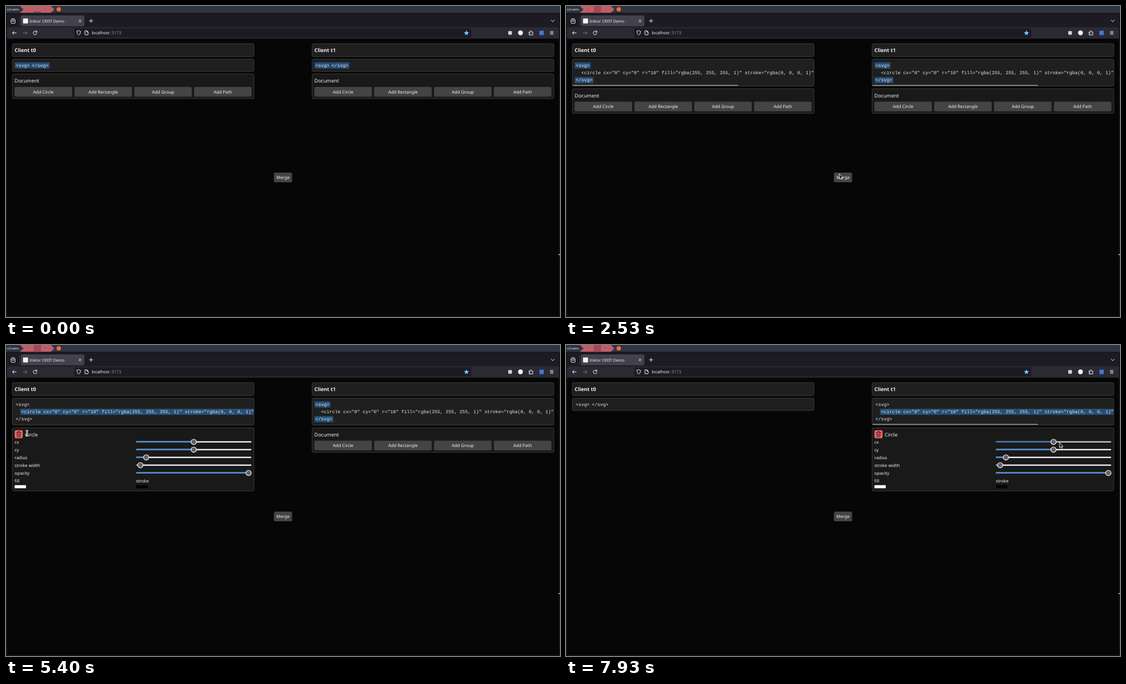
An HTML page for the animation above (8 s loop, 998x561 px).

```html
<!DOCTYPE html>
<html lang="en">
<head>
<meta charset="utf-8">
<title>CRDT demo</title>
<style>
  html, body { margin: 0; width: 100%; height: 100%; overflow: hidden; background: #060606; }
  svg { display: block; width: 998px; height: 561px; }
  text { font-family: "Noto Sans", sans-serif; font-size: 7.85px; fill: #f2f2f2; text-rendering: geometricPrecision; white-space: pre; }
  .code { font-family: "Liberation Mono", monospace; font-size: 8.32px; fill: #e9e9e9; }
  .head { font-size: 9.15px; font-weight: 700; }
  .title { font-size: 9px; }
  .mid { text-anchor: middle; }
  .icon { fill: none; stroke: #f0f0f4; stroke-width: 1; stroke-linecap: round; stroke-linejoin: round; }
  .box { stroke: #484848; stroke-width: .8; }
  .pointer { fill: #111; stroke: #fff; stroke-width: .9; stroke-linejoin: round; }
</style>
</head>
<body>
<svg id="stage" viewBox="0 0 998 561"></svg>
<script>
const LOOP = 8000, STEP = 200 / 3;
const SHIFT = 540;   // distance between the two clients
const GROW = 26.6;   // extra height of the three-line code box

const rect = (x, y, w, h, fill, r = 0, extra = '') =>
  `<rect x="${x}" y="${y}" width="${w}" height="${h}" rx="${r}" fill="${fill}" ${extra}/>`;
const text = (x, y, str, cls = '', extra = '') =>
  `<text x="${x}" y="${y}" class="${cls}" ${extra}>${str.replace(/</g, '&lt;')}</text>`;
const icon = (d, extra = '') => `<path class="icon" d="${d}" ${extra}/>`;
const dot = (x, y, r, fill, extra = '') => `<circle cx="${x}" cy="${y}" r="${r}" fill="${fill}" ${extra}/>`;
const group = (id, body, extra = '') => `<g id="${id}" ${extra}>${body}</g>`;
const box = (y, h, fill) => rect(11.4, y, 435.4, h, fill, 2.5, 'class="box"');

const button = (x, y, w, label) =>
  rect(x, y, w, 17.4, '#444446', 2.5) + text(x + w / 2, y + 11.6, label, 'mid');

// A code token with its optional selection highlight.
const token = (x, y, str, selected, w = str.length * 4.993 + 4) =>
  (selected ? rect(x, y - 8, w, 11, '#264f78') : '') + text(x + 2, y, str, 'code');

const CIRCLE = '<circle cx="0" cy="0" r="10" fill="rgba(255, 255, 255, 1)" stroke="rgba(0, 0, 0, 1)"';

const shortCode = selected => box(95.9, 22.2, '#1f1f1f') +
  token(15.6, 109.7, '<svg>', selected) + token(44.6, 109.7, '</svg>', selected);

const tallCode = circleSelected => box(95.9, 48.6, '#1f1f1f') +
  token(15.6, 109.7, '<svg>', !circleSelected) +
  token(25.6, 123, CIRCLE, circleSelected, 420.8) +
  token(15.6, 136.3, '</svg>', !circleSelected);

const documentPanel = dy => `<g transform="translate(0 ${dy})">` + box(122.6, 44.5, '#191919') +
  text(15.6, 138.2, 'Document', 'title') +
  ['Add Circle', 'Add Rectangle', 'Add Group', 'Add Path']
    .map((label, i) => button(15.5 + i * 107.8, 146, 103.6, label)).join('') + '</g>';

const slider = (label, knob, i, id) => {
  const y = 174.8 + i * 14;
  return text(15.6, y + 3, label) +
    `<g class="slider${i}">` + rect(234.4, y - 1.3, 207.8, 2.6, '#e9e9ed', 1.3) +
    rect(234.4, y - 1.3, knob - 234.4, 2.6, '#4a86d6', 1.3) + '</g>' +
    dot(knob, y, 4.8, '#626268', 'stroke="#f4f4f6" stroke-width="1.2"');
};

const circlePanel = () => box(149.3, 113.9, '#191919') +
  rect(15.6, 153.8, 14.6, 14.4, '#ea6666', 2.5) +
  icon('M19 157.6h8M21.4 157.4v-1.4h3.2v1.4M19.8 157.8l.5 8h5.4l.5-8M21.9 159.8v4M24.1 159.8v4', 'style="stroke:#3a1214;stroke-width:.9"') +
  text(34, 164.5, 'Circle', 'title') +
  [['cx', 338.2], ['cy', 338.2], ['radius', 252.5], ['stroke width', 242.1], ['opacity', 437]]
    .map(([label, knob], i) => slider(label, knob, i)).join('') +
  text(15.6, 247.8, 'fill') + rect(15.6, 252.8, 20.4, 5.6, '#fff') +
  text(234.2, 247.8, 'stroke') + rect(234.4, 252.8, 20.8, 5.6, '#000');

const views = {
  empty: () => shortCode(true) + documentPanel(0),
  added: () => tallCode(false) + documentPanel(GROW),
  picked: () => tallCode(true) + circlePanel(),
  removed: () => shortCode(false)
};

const client = n => group(`client${n}`,
  box(67.9, 23.4, '#1f1f1f') + text(15.6, 83.1, `Client t${n}`, 'head') +
  Object.entries(views).map(([name, draw]) => group(name + n, draw())).join('') +
  group(`scroll${n}`, rect(12, 142.3, 298.4, 1.8, '#858585', .9)),
  `transform="translate(${n * SHIFT} 0)"`);

const desktop = () =>
  rect(0, 0, 998, 561, '#15161a') + rect(0, 0, 998, 12.3, '#2e3541') +
  text(1.4, 8, 'columns', '', 'style="font:5.25px \'DejaVu Sans Mono\',monospace"') +
  '<path d="M25 0H81L87 6.1L81 12.3H25L31.5 6.1Z" fill="#bd5f68"/>' +
  group('before', rect(50, 10.3, 13, 2, '#46536b')) +
  group('after', rect(50, 0, 13, 12.3, '#a04a55')) +
  [41, 56, 71].map(x => dot(x, 5.4, 1, '#9c4650')).join('') +
  dot(95, 6, 4, '#f0693a');

const browser = () =>
  rect(2, 14, 994, 545, '#060606', 2) + rect(2, 14, 994, 25, '#1c1b22', 2) +
  rect(2, 38.3, 994, 20.5, '#2b2a33') + rect(24, 19, .7, 16, '#45444f') +
  rect(26.6, 17, 114.6, 19.4, '#42414d', 2.2) + rect(30.7, 22.4, 9, 9, '#f4f4f4', 1) +
  text(42.4, 29.6, 'Inktor CRDT Demo', '', 'style="font-size:7.2px"') +
  icon('M131.4 24.8l4 4M135.4 24.8l-4 4', 'stroke-width=".8"') +
  icon('M150 26.8h6.4M153.2 23.6v6.4M982 25.5l2.9 2.8l2.9-2.8') +
  icon('M9.2 25.2h7.2v5.2q0 .8-.8.8h-5.6q-.8 0-.8-.8zM10 23h5.6M11.2 27.6h3.2') +
  icon('M18.4 48.5h-6.6M14.6 45.5l-3 3l3 3') +
  icon('M31 48.5h6.6M34.8 45.5l3 3l-3 3', 'opacity=".35"') +
  icon('M55 46.5a3.3 3.3 0 1 0 .6 2.7M55.6 44.8v2.4h-2.4') +
  rect(123, 40.2, 715, 16.6, '#1c1b22', 2.2) +
  icon('M131 44.4l3.3 1.2q.2 5-3.3 7q-3.500-2-3.300-7z') +
  icon('M142.600 44.700h3.200l2.200 2.200v5h-5.400zM145.600 44.800v2.300h2.300') +
  text(154.4, 51.300, 'localhost<tspan/>'.replace('<tspan/>', ''), '', 'style="font-size:7.6px"') +
  text(188.100, 51.300, ':5173', '', 'style="font-size:7.6px;fill:#96959e"') +
  '<path d="M829.500 44l1.350 2.900l3.150.4l-2.300 2.200l.6 3.100l-2.800-1.500l-2.800 1.500l.6-3.100l-2.300-2.200l3.150-.4z" fill="#69cdf8"/>' +
  rect(904.800, 45.300, 6.600, 6.400, '#d4d4da', 1) + dot(926.800, 48.400, 4.300, '#f5f5f7') +
  icon('M942.300 47h2v-1.200a1.100 1.100 0 0 1 2.200 0v1.200h2.500v5.200h-6.700v-1.600h1a1 1 0 0 0 0-2h-1z') +
  rect(961, 44.600, 7.800, 7.800, '#3f78d8', 1) +
  icon('M980.300 46h5.400M980.300 48.400h5.400M980.300 50.800h5.400', 'stroke-width=".9"');

const pointers = {
  arrow: 'M0 0V9.300L2.300 7.400L3.700 10.300L5.100 9.600L3.800 6.800H6.300Z',
  hand: 'M-1 0Q0-1.200 1 0V3.200L3.500 3.700Q4.600 4 4.400 5.400L3.700 8.800H-.8L-3 5.500Q-2.400 4.300-1 5.200Z',
  beam: 'M-2-5H-.5L0-4.500L.5-5H2V-4H.6V4H2V5H.5L0 4.500L-.5 5H-2V4H-.6V-4H-2Z'
};

// time, x, y, shape used from this time on
const path = [
  [66, 607, 452, 'arrow'], [400, 340, 300, 'arrow'], [870, 75, 160, 'arrow'],
  [1070, 67, 154, 'arrow'], [1250, 68, 155, 'arrow'], [1730, 441, 263, 'arrow'],
  [1930, 488.6, 289, 'arrow'], [2130, 494, 307, 'arrow'], [2600, 492, 302, 'arrow'],
  [3120, 150, 129, 'hand'], [3200, 140, 126, 'hand'], [3600, 140, 125, 'hand'],
  [3800, 152, 136, 'arrow'], [3870, 155, 139.5, 'arrow'], [4330, 179, 164, 'arrow'],
  [4600, 221, 166, 'arrow'], [4800, 221, 166, 'arrow'], [5330, 44, 160, 'beam'],
  [5400, 37.8, 159, 'beam'], [5530, 25, 159, 'hand'], [5740, 22, 159, 'hand'],
  [5860, 45, 157, 'arrow'], [6400, 618, 124, 'hand'], [6470, 629.6, 122, 'hand'],
  [6900, 629.6, 122, 'hand'], [7400, 756, 116, 'hand'], [7530, 775, 124, 'arrow'],
  [7800, 878, 173, 'arrow'], [7930, 889, 176, 'arrow']
];

const timeline = [
  [[0, 'empty'], [1070, 'added'], [3600, 'picked'], [5740, 'removed']],
  [[0, 'empty'], [2200, 'added'], [6600, 'picked']]
];
const scrollShown = [[[1070, 5000]], [[2200, 3600], [6330, LOOP]]];

const stage = document.getElementById('stage');
stage.innerHTML = desktop() + browser() + client(0) + client(1) +
  button(482.6, 300.6, 32.8, 'Merge') +
  '<path d="M994.800 448.300L996.500 447.200L998 448.400V449.600Z" fill="#eee"/>' +
  group('pointer', '<path class="pointer"/>');

const byId = id => document.getElementById(id);
const show = (id, on) => { byId(id).style.display = on ? '' : 'none'; };
const pointer = byId('pointer'), pointerShape = pointer.firstChild;
const hoverTrack = byId('picked1').querySelector('.slider0');

function placePointer(t) {
  show('pointer', t >= path[0][0]);
  const i = Math.max(0, path.findLastIndex(key => key[0] <= t));
  const [t0, x0, y0, shape] = path[i];
  const [t1, x1, y1] = path[i + 1] || [t0 + 1, x0, y0];
  const p = Math.min(1, Math.max(0, (t - t0) / (t1 - t0)));
  pointer.setAttribute('transform', `translate(${x0 + (x1 - x0) * p} ${y0 + (y1 - y0) * p})`);
  pointerShape.setAttribute('d', pointers[shape]);
}

function render(t) {
  timeline.forEach((changes, n) => {
    const current = changes.findLast(change => change[0] <= t)[1];
    Object.keys(views).forEach(name => show(name + n, name === current));
    show(`scroll${n}`, scrollShown[n].some(([from, to]) => t >= from && t < to));
  });
  show('before', t < 66);
  show('after', t >= 66);
  hoverTrack.style.filter = t > 7790 ? 'brightness(.82)' : '';
  placePointer(t);
}

const start = performance.now();
function tick() {
  const t = (performance.now() - start) % LOOP;
  render(Math.floor((t + 4) / STEP) * STEP % LOOP);
  requestAnimationFrame(tick);
}
tick();
</script>
</body>
</html>
```
